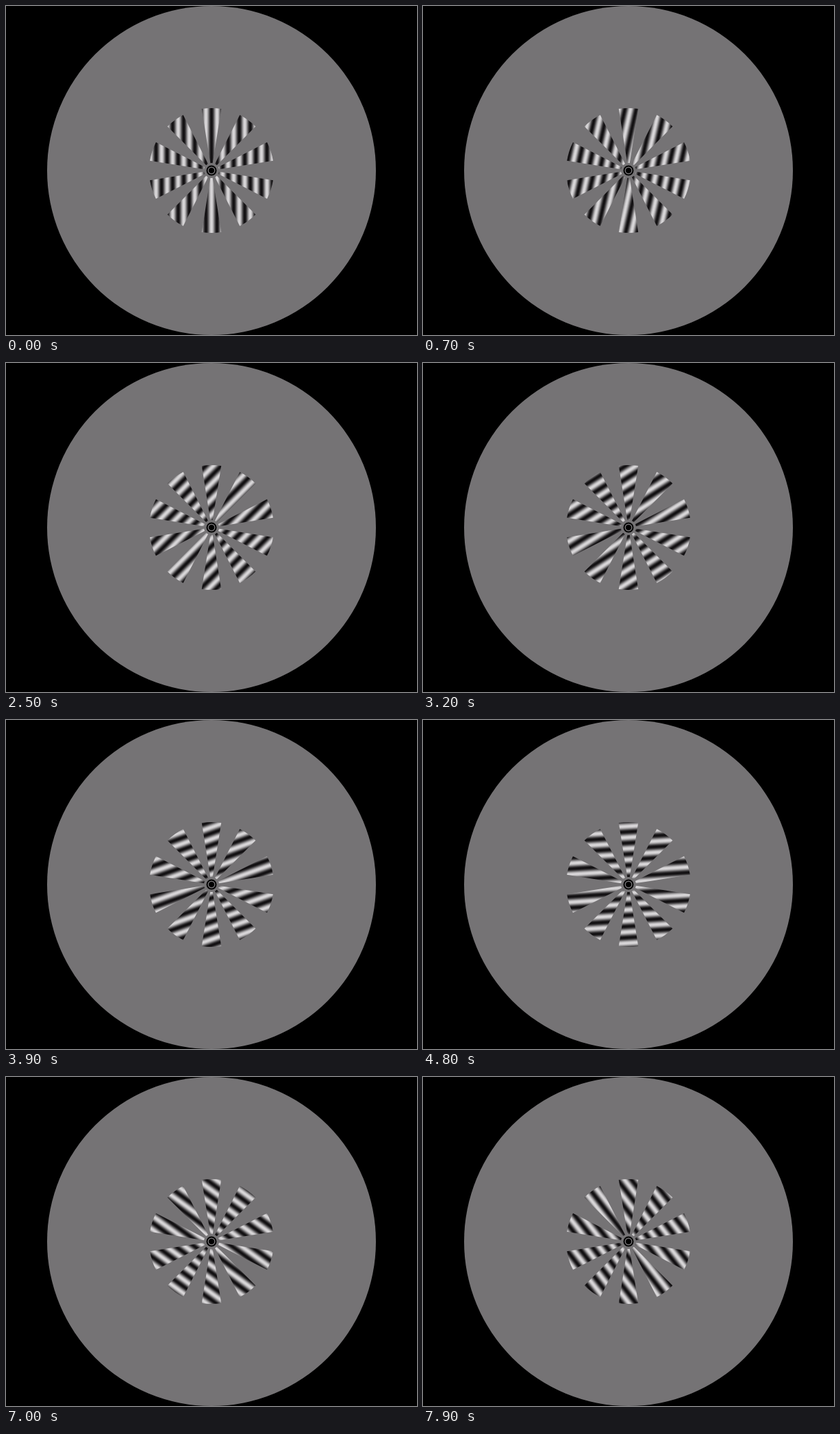
An HTML page with a canvas that plays this animation: 600x480 px, repeating every 8000 ms.

```html
<!DOCTYPE html>
<html lang="en">
<head>
<meta charset="utf-8">
<title>Grating pinwheel</title>
<style>
  html, body { margin: 0; width: 100%; height: 100%; overflow: hidden; background: #000; }
  canvas { display: block; }
</style>
</head>
<body>
<canvas id="stage" width="600" height="480"></canvas>
<script>
const ctx = document.getElementById('stage').getContext('2d');
const TAU = Math.PI * 2;
const GRAY = '#757375';
const STEP = 100, STEPS = 80;
const TURN = 1.8 * Math.PI / 180;   // grating rotation per step
const DRIFT = 0.068;                // grating cycles per step
const PERIOD = 16.2, INNER = 11, OUTER = 91;
const HALF = TAU / 40, REACH = 100;

function disc(radius, color) {
  ctx.fillStyle = color;
  ctx.beginPath();
  ctx.arc(0, 0, radius, 0, TAU);
  ctx.fill();
}

// Every second wedge, starting at the top or at its neighbour
function wedges(first) {
  const path = new Path2D();
  for (let i = first; i < 10; i += 2) {
    const mid = i * TAU / 10 - TAU / 4;
    const part = new Path2D();
    part.arc(0, 0, OUTER, mid - HALF, mid + HALF);
    part.arc(0, 0, INNER, mid + HALF, mid - HALF, true);
    part.closePath();
    path.addPath(part);
  }
  return path;
}

// Sine grating whose dark bars sit at whole cycles from the given phase
function grating(angle, phase) {
  const x = Math.cos(angle) * REACH, y = Math.sin(angle) * REACH;
  const g = ctx.createLinearGradient(-x, -y, x, y);
  for (let u = -REACH; u <= REACH; u++) {
    const wave = Math.cos(TAU * (u / PERIOD - phase));
    const v = Math.round(117 - 102 * wave);
    g.addColorStop((u + REACH) / (2 * REACH), `rgb(${v},${v - 2},${v})`);
  }
  return g;
}

const sets = [wedges(0), wedges(1)];

function draw(step) {
  ctx.setTransform(1, 0, 0, 1, 0, 0);
  ctx.fillStyle = '#000';
  ctx.fillRect(0, 0, 600, 480);
  ctx.translate(300, 240);
  disc(240, GRAY);
  sets.forEach((set, i) => {
    ctx.fillStyle = grating(step * TURN, step * DRIFT + i / 2);
    ctx.fill(set);
  });
  disc(7.5, '#000');
  disc(5.5, GRAY);
  disc(4, '#000');
}

let shown = -1;
const start = performance.now();

function tick() {
  const time = Math.max(0, performance.now() - start);
  const step = Math.floor(time / STEP) % STEPS;
  if (step !== shown) draw(shown = step);
  requestAnimationFrame(tick);
}
tick();
</script>
</body>
</html>
```
